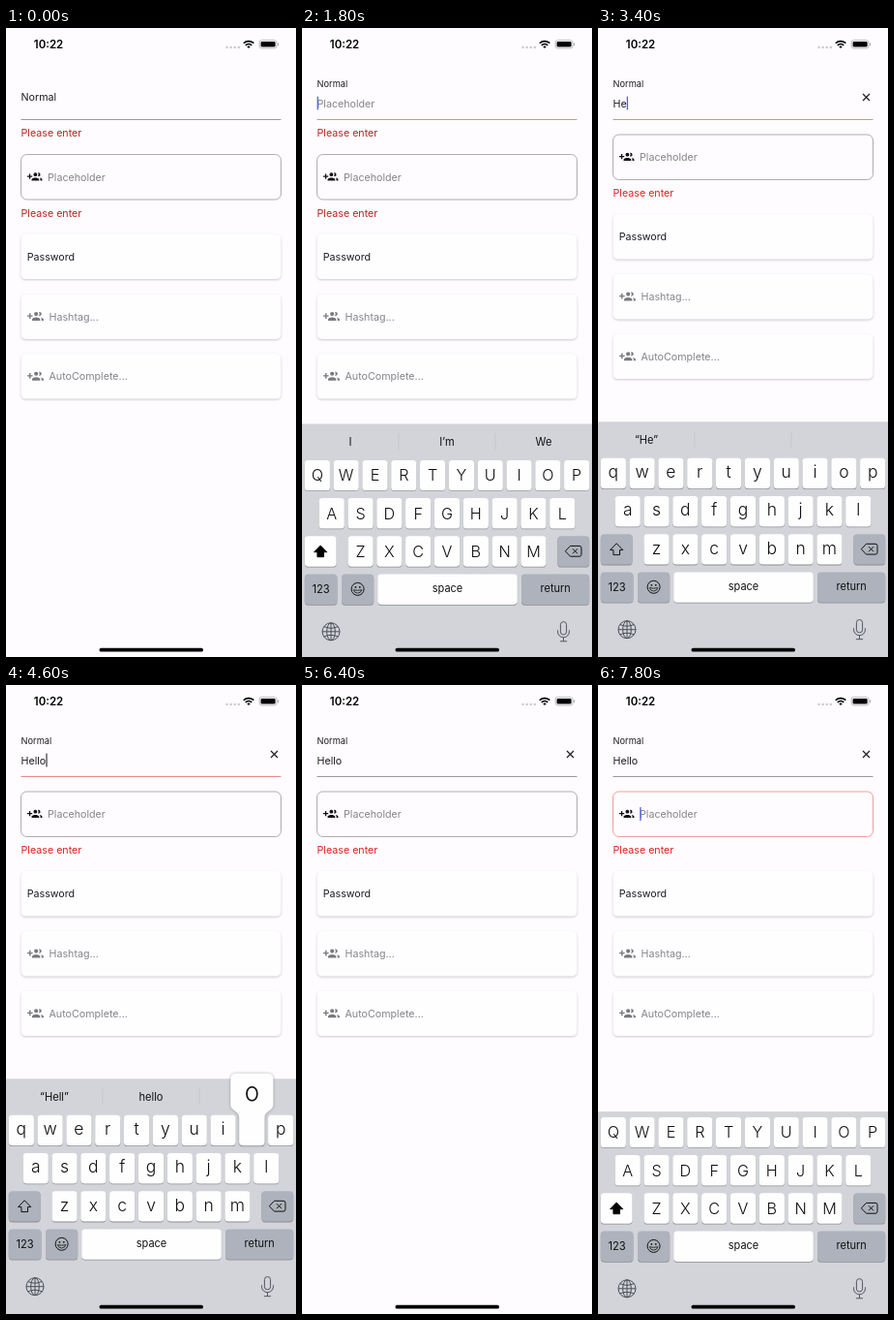
These frames come from a looping animation (300x649 px, 8 s). An HTML page:

```html
<!DOCTYPE html>
<html lang="en">
<head>
<meta charset="utf-8">
<title>Form inputs</title>
<style>
  html, body { margin: 0; width: 300px; height: 649px; overflow: hidden; background: #fefcff; }
  svg { display: block; font-family: Inter, Roboto, sans-serif; }
  .card { filter: drop-shadow(0 1.1px .8px rgba(0, 0, 0, .2)); }
  .popup { filter: drop-shadow(0 .5px 1.5px rgba(0, 0, 0, .3)); }
</style>
</head>
<body>
<svg id="stage" width="300" height="649" viewBox="0 0 300 649"></svg>
<script>
const LOOP = 8000, STEP = 200, BODY = 10.7;
const INK = '#1c1b1f', MUTED = '#868488', FOCUS = '#e98983', IDLE = '#9c999d', CARET = '#4c62dc';
const KEY_W = 26.2, KEY_H = 31.4, PITCH = 29.82;
const ROWS = [['qwertyuiop', 443.8], ['asdfghjkl', 483], ['zxcvbnm', 522.2]];
const BOTTOM_ROW = 561.4;

// [time, field value, key being shown as a popup]
const TYPING = [
  [0, '', ''], [2600, '', 'H'], [2800, 'H', 'H'], [3000, 'H', ''], [3200, 'He', 'e'], [3400, 'He', ''],
  [3800, 'Hel', 'l'], [4000, 'Hel', ''], [4200, 'Hell', 'l'], [4400, 'Hell', ''], [4600, 'Hello', 'o'], [4800, 'Hello', '']
];
const SUGGESTIONS = {
  '': ['I', 'I’m', 'We'], H: ['“H”', 'He', 'Hi'], He: ['“He”', '', ''], Hel: ['“Hel”', 'hello', 'help'],
  Hell: ['“Hell”', 'hello', 'hell'], Hello: ['“Hello”', 'hello', 'hello’s']
};

const stage = document.getElementById('stage');
const ruler = document.createElement('canvas').getContext('2d');

const text = (s, x, y, size = BODY, fill = INK, extra = '') =>
  `<text x="${x}" y="${y}" font-size="${size}" fill="${fill}" ${extra}>${s}</text>`;
const centered = (s, x, y, size, extra = '') => text(s, x, y, size, '#111', `text-anchor="middle" ${extra}`);
const rect = (x, y, w, h, r, fill, extra = '') =>
  `<rect x="${x}" y="${y}" width="${w}" height="${h}" rx="${r}" fill="${fill}" ${extra}/>`;
const path = (d, fill, extra = '') => `<path d="${d}" fill="${fill}" ${extra}/>`;
const line = (d, color, width, extra = '') =>
  path(d, 'none', `stroke="${color}" stroke-width="${width}" ${extra}`);
const group = (x, y, content, scale = 1) =>
  `<g transform="translate(${x} ${y}) scale(${scale})">${content}</g>`;

const spring = ms => ms < 0 ? 1 : (1 + .01826 * ms) * Math.exp(-.01826 * ms);

function textWidth(s) {
  ruler.font = `${BODY}px Inter, Roboto, sans-serif`;
  return ruler.measureText(s).width;
}

const people = (x, y, scale, color) => group(x, y, path(
  'M13 13c-2 0-6 1-6 3v2h12v-2c0-2-4-3-6-3M19.6 13.2c.9.7 1.4 1.6 1.4 2.8v2h3v-2c0-1.5-2.4-2.5-4.4-2.8' +
  'M13 11a3 3 0 0 0 0-6 3 3 0 0 0 0 6M18 11a3 3 0 0 0 0-6l-.9.1a5 5 0 0 1 0 5.8l.9.1' +
  'M8 10H5V7H3v3H0v2h3v3h2v-3h3z', color), scale);

function statusBar() {
  const arc = r => `M${-r * .707} ${-r * .707}A${r} ${r} 0 0 1 ${r * .707} ${-r * .707}`;
  return text('10:22', 44, 21, 11.5, '#000', 'font-weight="600" text-anchor="middle"') +
    [228.5, 232.6, 236.7, 240.8].map(x => `<circle cx="${x}" cy="20" r="1.2" fill="#c9c7ca"/>`).join('') +
    group(251, 21, line(arc(7.4) + arc(4.5), '#000', 1.7) + path('M0 0L-1.7-1.8A2.5 2.5 0 0 1 1.7-1.8z', '#000')) +
    rect(262.2, 12.6, 17.8, 8.4, 2.5, 'none', 'stroke="#a9a7aa" stroke-width=".8"') +
    rect(263.6, 14, 15, 5.6, 1.4, '#000') + rect(281, 15.3, 1, 3, .5, '#a9a7aa');
}

function form(t, value) {
  const first = t >= 1400 && t < 5800, second = t >= 7600;
  const float = Math.min(1, Math.max(0, (t - 1340) / 200));
  const typing = t >= 2600 && t < 5000;
  const blink = typing || (t - (second ? 7600 : t < 2600 ? 1400 : 5000)) % 1000 < 600;
  const red = value ? '#dd2222' : '#b52525';
  const card = (y, label, icon) =>
    rect(15.5, y, 269, 46.5, 5, '#fefdff', 'class="card"') +
    (icon ? people(22, y + 15, .705, '#7b797d') : '') +
    text(label, icon ? 44.5 : 21.7, y + 27.2, BODY, icon ? MUTED : INK);

  let s = text('Normal', 15.5, 75 - 13.7 * float, BODY - 1.45 * float);
  if (value) s += text(value, 15.5, 81.5) + line('M274 68l7 7m0-7l-7 7', '#222', 1.3);
  else if (float === 1) s += text('Placeholder', 15.5, 81.5, BODY, MUTED);
  s += rect(15.5, 94, 269, 1, 0, first ? FOCUS : IDLE);
  if (first && blink) {
    const x = 15.6 + textWidth(value);
    s += rect(x, 70.5, 1.3, 14, .5, t < 3800 ? CARET : '#444');
  }
  if (!value) s += text('Please enter', 15.5, 112.3, BODY, red);

  const rest = rect(15.5, 130.5, 269, 46.5, 6, 'none', `stroke="${second ? FOCUS : IDLE}" stroke-width=".8"`) +
    people(22, 146, .645, '#111') + text('Placeholder', 43, 157.9, BODY, MUTED) +
    (second && blink ? rect(43.3, 146.5, 1.3, 14, .5, CARET) : '') +
    text('Please enter', 15.5, 194.5, BODY, red) +
    card(212.6, 'Password') + card(274.4, 'Hashtag...', true) + card(336.1, 'AutoComplete...', true);
  return s + group(0, value ? -20.5 : 0, rest);
}

function popup(letter, x, y) {
  const l = x - 9, r = x + KEY_W + 9, top = y - 43, k = x + KEY_W, b = y + KEY_H;
  return path(`M${l + 6} ${top}H${r - 6}q6 0 6 6V${y - 11}C${r} ${y - 4} ${k} ${y - 5} ${k} ${y + 3}V${b - 4}q0 4-4 4` +
    `H${x + 4}q-4 0-4-4V${y + 3}C${x} ${y - 5} ${l} ${y - 4} ${l} ${y - 11}V${top + 6}q0-6 6-6z`, '#fefefe', 'class="popup"') +
    centered(letter, x + KEY_W / 2, y - 15, 26, 'font-weight="350"');
}

function keyboard(t, value, pressed) {
  const second = t >= 7400;
  const caps = second || !value;
  const key = (x, y, w, fill = '#fefefe') =>
    rect(x, y + .8, w, KEY_H, 3.6, '#8c8e93') + rect(x, y, w, KEY_H, 3.6, fill);
  const GREY = '#adb2bc';
  const top = second ? 438 : 406.3;
  let s = rect(0, top, 300, 520, 0, '#d2d4d9'), bubble = '';

  if (!second) {
    const settled = pressed ? value.slice(0, -1) : value;
    s += rect(99.6, 416, .8, 17, 0, '#c0c2c7') + rect(199.6, 416, .8, 17, 0, '#c0c2c7');
    SUGGESTIONS[settled].forEach((word, i) => {
      const label = t >= 5800 ? word.replace(/o.*/, '<tspan fill="#a3a5aa">$&</tspan>') : word;
      s += centered(label, 50 + 100 * i, 428.8, 11.1);
    });
  }

  for (const [letters, y] of ROWS) {
    const left = (300 - KEY_W - (letters.length - 1) * PITCH) / 2;
    [...letters].forEach((c, i) => {
      const x = left + i * PITCH;
      s += key(x, y, KEY_W) + (caps
        ? centered(c.toUpperCase(), x + KEY_W / 2, y + 21.5, 16.2, 'font-weight="350"')
        : centered(c, x + KEY_W / 2, y + 20.3, 17.5, 'font-weight="350"'));
      if (c === pressed.toLowerCase()) bubble = popup(pressed, x, y);
    });
  }

  const shiftRow = ROWS[2][1];
  s += key(2.8, shiftRow, 32.8, caps ? '#fefefe' : GREY) +
    group(19.2, 538, path('M0-6.2L6.6.6H3.3V5.6H-3.3V.6H-6.6z', caps ? '#000' : 'none',
      'stroke="#111" stroke-width="1" stroke-linejoin="round"')) +
    key(264.4, shiftRow, 32.8, GREY) +
    line('M277.5 532.3H287a2 2 0 0 1 2 2v6.8a2 2 0 0 1-2 2h-9.5L272.4 537.7zM280 535.2l5 5m0-5l-5 5', '#111', 1, 'stroke-linejoin="round"') +
    key(2.8, BOTTOM_ROW, 33.6, GREY) + centered('123', 19.6, 580.8, 11.2) +
    key(41, BOTTOM_ROW, 33.2, GREY) +
    group(57.6, 576.8, '<circle r="6.5" fill="none" stroke="#111"/><circle cx="-2.2" cy="-2" r=".9" fill="#111"/>' +
      '<circle cx="2.2" cy="-2" r=".9" fill="#111"/>' + line('M-4.2.8Q0 2 4.2.8A4.3 4.3 0 0 1-4.2.8z', '#111', .8)) +
    key(78.2, BOTTOM_ROW, 144.6) + centered('space', 150.5, 580.2, 11) +
    key(227, BOTTOM_ROW, 70.2, GREY) + centered('return', 262.2, 580.2, 11) +
    group(30, 620.7, line('M-9 0a9 9 0 1 0 18 0a9 9 0 1 0-18 0H9M0-9V9M-4.3 0a4.3 9 0 1 0 8.6 0a4.3 9 0 1 0-8.6 0' +
      'M-7.2-5.2Q0-1.8 7.2-5.2M-7.2 5.2Q0 1.8 7.2 5.2', '#4b4f55', 1)) +
    group(270.5, 620.7, rect(-3.1, -10.2, 6.2, 13.4, 3.1, 'none', 'stroke="#53575d"') +
      line('M-6-1.5V0a6 6 0 0 0 12 0V-1.5M0 6V10M-3.6 10H3.6', '#53575d', 1));
  return s + bubble;
}

function render(t) {
  const [, value, pressed] = TYPING.filter(e => e[0] <= t).pop();
  const hidden = t < 5747 ? spring(t - 1428) : t < 7428 ? 1 - spring(t - 5747) : spring(t - 7428);
  stage.innerHTML = rect(0, 0, 300, 649, 0, '#fefcff') + statusBar() + form(t, value) +
    (hidden < .999 ? group(0, 243 * hidden, keyboard(t, value, pressed)) : '') +
    rect(96.5, 639.8, 107.5, 3.7, 1.85, '#000');
}

// The screen updates five times a second.
let shown = -1;
function tick() {
  const t = Math.floor(performance.now() % LOOP / STEP) * STEP;
  if (t !== shown) render(shown = t);
  requestAnimationFrame(tick);
}
tick();
</script>
</body>
</html>
```
